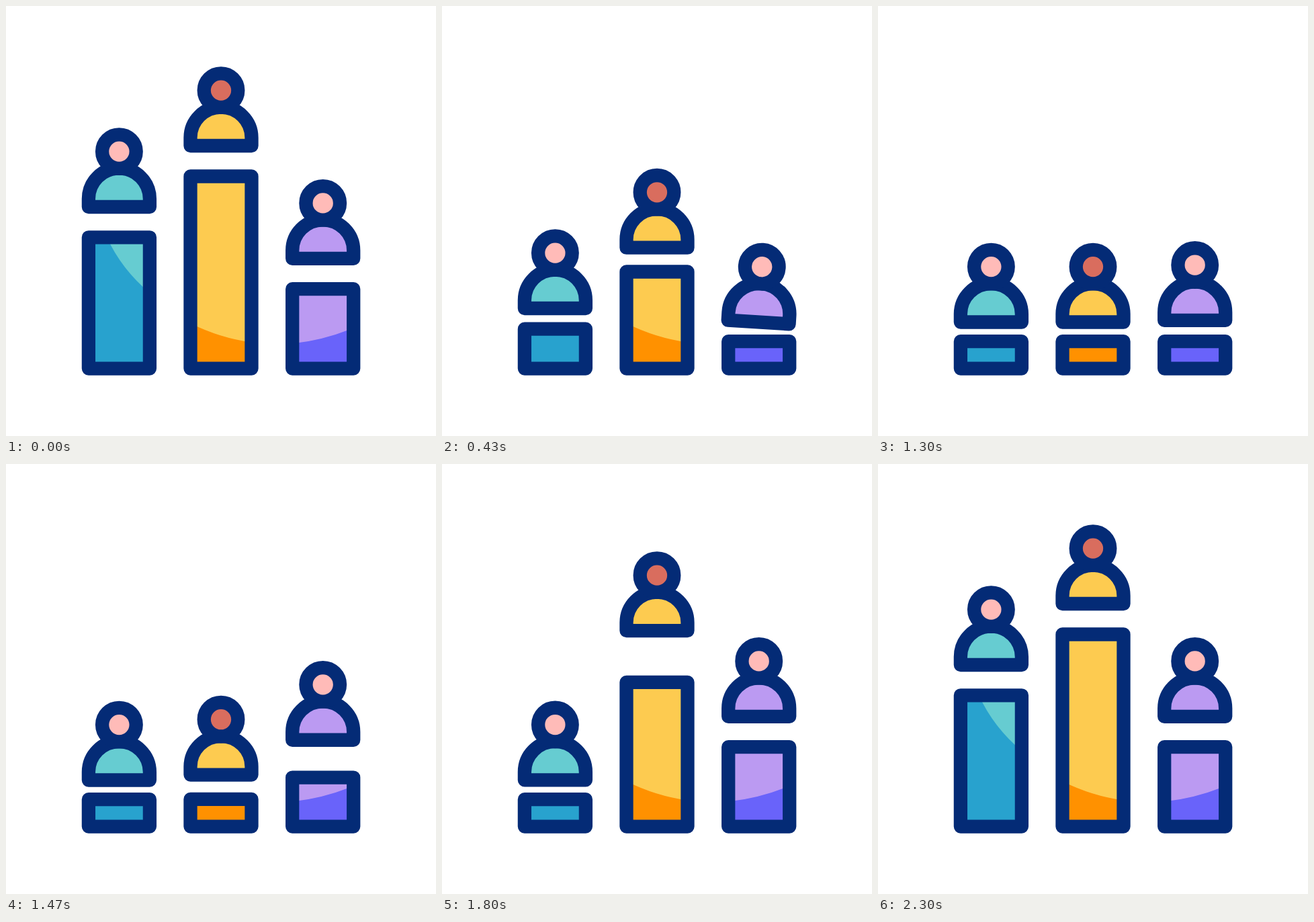
An HTML page for the animation above (2900 ms loop, 640 by 640 pixels).

```html
<!DOCTYPE html>
<html lang="en">
<head>
<meta charset="utf-8">
<title>Podium</title>
<style>
  html, body { margin: 0; width: 100%; height: 100%; overflow: hidden; background: #fff; }
  svg { display: block; width: 100%; height: 100%; }
</style>
</head>
<body>
<svg id="stage" viewBox="0 0 640 640"></svg>
<script>
const LOOP = 2900;
const FRAME = 100 / 3;
const NAVY = '#042b76';
const ORANGE = '#ff9100';
const LINE = 20.3;
const HALF = 45.5;      // half width of bars and bodies, on the stroke's centre line
const FLOOR = 539.6;
const LOW_BAR = 499.2;
const LOW_HEAD = 388.1;
const PIVOT = 73;       // distance from head centre to the rocking point

// Time spans (fall, lift, barLift) and landing are in animation frames.
const columns = [
  { x: 168.4, bar: 344.3, head: 216.6, skin: '#ffbbb8', body: '#66ccd1',
    light: '#28a2ce', shade: '#66ccd1', curve: 'M150 344Q172 392 214 427V344Z',
    fall: [5, 15.2], land: 15, lift: [53.9, 63], barLift: [55.85, 65.85] },
  { x: 320, bar: 253.5, head: 125.6, skin: '#d96d5e', body: '#fdcb50',
    light: '#fdcb50', shade: ORANGE, curve: 'M275 472.5Q318 494 365 500.5V540H275Z',
    fall: [4, 20.3], land: 20, lift: [42.4, 57.8], barLift: [43.7, 59.7] },
  { x: 471.7, bar: 421.2, head: 293.4, skin: '#ffbbb8', body: '#bb9af2',
    light: '#bb9af2', shade: '#6963fa', curve: 'M426 502.5Q475 497 517 479V540H426Z',
    fall: [0, 10], land: 10, lift: [38, 48.2], barLift: [39.5, 49.6] }
];

// Each ray starts at (x, 68) and runs along (dx, dy).
const rays = [
  { x: 286, dx: -20, dy: -20 },
  { x: 320, dx: 0, dy: -25 },
  { x: 354, dx: 20, dy: -20 }
];

const stage = document.getElementById('stage');

function add(parent, tag, attrs) {
  const node = document.createElementNS('http://www.w3.org/2000/svg', tag);
  set(node, attrs);
  parent.append(node);
  return node;
}

function set(node, attrs) {
  for (const key in attrs) node.setAttribute(key, attrs[key]);
}

const outline = { stroke: NAVY, 'stroke-width': LINE, 'stroke-linejoin': 'round' };

function ease(frame, [start, end]) {
  const p = Math.min(1, Math.max(0, (frame - start) / (end - start)));
  return p * p * (3 - 2 * p);
}

const mix = (a, b, p) => a + (b - a) * p;

columns.forEach((c, i) => {
  const box = { x: c.x - HALF, width: 2 * HALF };
  const clip = add(stage, 'clipPath', { id: 'bar' + i });
  const fill = add(stage, 'g', { 'clip-path': `url(#bar${i})` });
  add(fill, 'rect', { ...box, y: 240, height: 300, fill: c.light });
  add(fill, 'path', { d: c.curve, fill: c.shade });
  c.rects = [
    add(clip, 'rect', box),
    add(stage, 'rect', { ...box, ...outline, fill: 'none' })
  ];
  c.person = add(stage, 'g', {});
  add(c.person, 'path', {
    ...outline, fill: c.body,
    d: `M${-HALF} 9.4V-2.6a${HALF} ${HALF} 0 0 1 ${2 * HALF} 0V9.4Z`
  });
  add(c.person, 'circle', { ...outline, cy: -PIVOT, r: 25.3, fill: c.skin });
});

for (const ray of rays) {
  ray.node = add(stage, 'line', {
    stroke: ORANGE, 'stroke-width': LINE, 'stroke-linecap': 'round'
  });
}

// Rocks right, then left, then settles.
function wobble(u) {
  return 4.2 * ease(u, [0, 4]) - 7.6 * ease(u, [4, 8]) + 3.4 * ease(u, [8, 12]);
}

function draw(time) {
  const frame = Math.floor((time % LOOP + 4) / FRAME);

  for (const c of columns) {
    const fall = ease(frame, c.fall);
    const top = mix(c.bar, LOW_BAR, fall - ease(frame, c.barLift));
    const head = mix(c.head, LOW_HEAD, fall - ease(frame, c.lift));
    for (const rect of c.rects) set(rect, { y: top, height: FLOOR - top });
    const tilt = wobble(frame - c.land);
    set(c.person, { transform: `translate(${c.x} ${head + PIVOT}) rotate(${tilt})` });
  }

  const tip = ease(frame, [57.1, 63.5]);
  const tail = ease(frame, [61.5, 69]);
  for (const { node, x, dx, dy } of rays) {
    set(node, {
      x1: x + dx * tail, y1: 68 + dy * tail,
      x2: x + dx * tip, y2: 68 + dy * tip,
      visibility: tip > tail ? 'visible' : 'hidden'
    });
  }
}

const start = performance.now();
function tick() {
  draw(performance.now() - start);
  requestAnimationFrame(tick);
}
tick();
</script>
</body>
</html>
```
